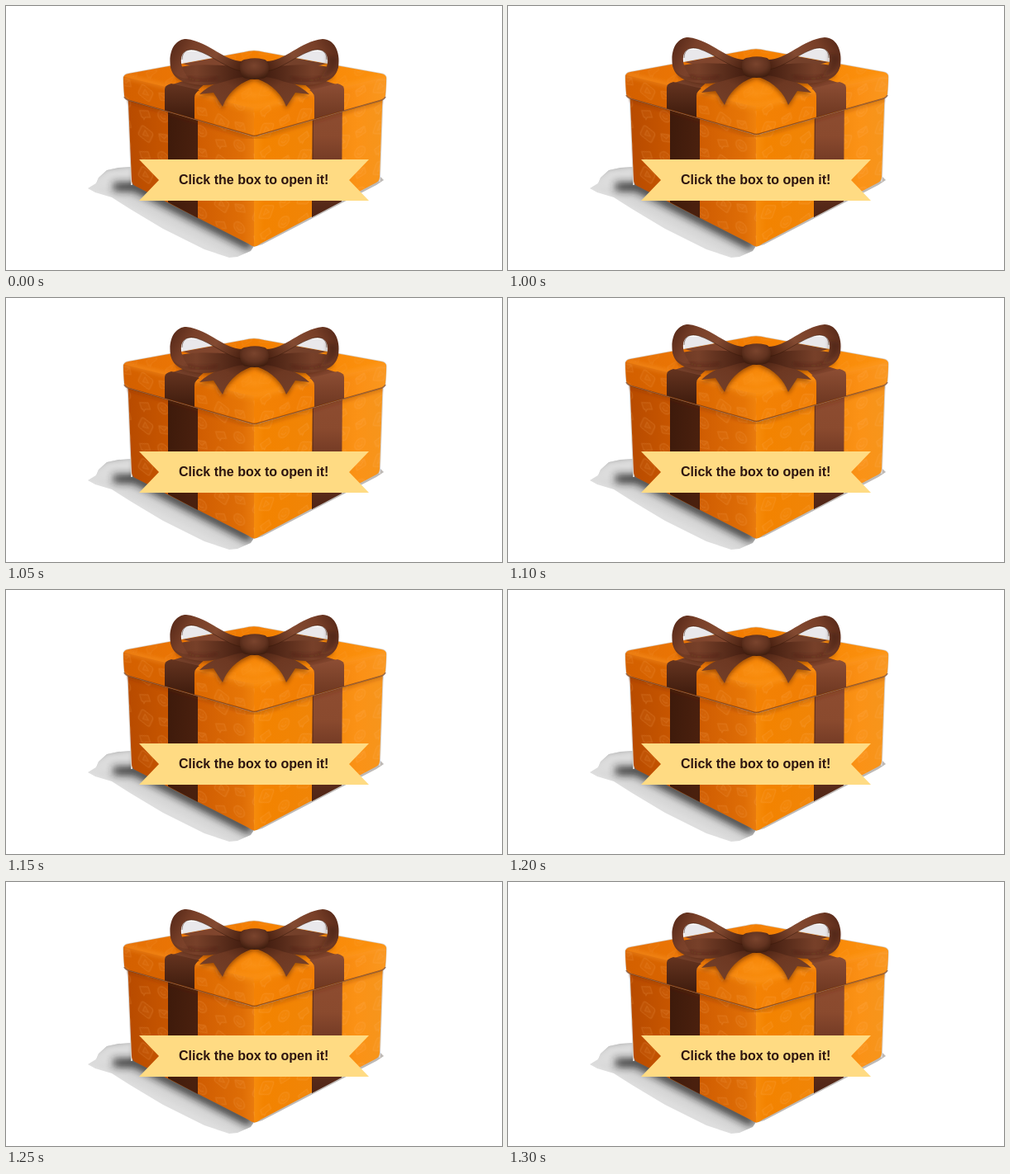
An HTML page for the animation above (1350 ms loop, 600x320 px).

```html
<!DOCTYPE html>
<html lang="en">
<head>
<meta charset="utf-8">
<title>Gift box</title>
<style>
html, body { margin: 0; width: 100%; height: 100%; overflow: hidden; background: #fff; }
svg { display: block; width: 100%; height: 100%; }
text { font: bold 16px "Liberation Sans", Arial, sans-serif; fill: #2d1510; }
</style>
</head>
<body>
<svg viewBox="0 0 600 320">
<defs>
  <linearGradient id="bodyL" gradientUnits="userSpaceOnUse" x1="148" y1="0" x2="301" y2="0">
    <stop stop-color="#b84b00"/><stop offset=".3" stop-color="#c65500"/>
    <stop offset=".56" stop-color="#d05d02"/><stop offset=".9" stop-color="#de6d06"/><stop offset="1" stop-color="#ea7c0e"/>
  </linearGradient>
  <linearGradient id="bodyR" gradientUnits="userSpaceOnUse" x1="300" y1="0" x2="456" y2="0">
    <stop stop-color="#f68c0c"/><stop offset=".08" stop-color="#f38300"/>
    <stop offset=".5" stop-color="#f08508"/><stop offset=".8" stop-color="#fb9216"/><stop offset="1" stop-color="#f6951c"/>
  </linearGradient>
  <linearGradient id="lidL" gradientUnits="userSpaceOnUse" x1="142" y1="0" x2="301" y2="0">
    <stop stop-color="#d46000"/><stop offset=".3" stop-color="#d86400"/><stop offset=".6" stop-color="#dd6a02"/>
    <stop offset=".9" stop-color="#e67506"/><stop offset="1" stop-color="#f0820c"/>
  </linearGradient>
  <linearGradient id="lidR" gradientUnits="userSpaceOnUse" x1="300" y1="0" x2="460" y2="0">
    <stop stop-color="#f48204"/><stop offset=".45" stop-color="#f07e04"/><stop offset=".8" stop-color="#fb9015"/><stop offset="1" stop-color="#f9971f"/>
  </linearGradient>
  <linearGradient id="lidTop" gradientUnits="userSpaceOnUse" x1="142" y1="0" x2="460" y2="0">
    <stop stop-color="#e57006"/><stop offset=".35" stop-color="#ee7802"/><stop offset=".6" stop-color="#f68302"/><stop offset="1" stop-color="#fc920f"/>
  </linearGradient>
  <linearGradient id="bandL" x1="0" y1="0" x2="1" y2=".3">
    <stop stop-color="#3d1a0b"/><stop offset="1" stop-color="#4a200e"/>
  </linearGradient>
  <linearGradient id="bandR" x1="0" y1="0" x2="0" y2="1">
    <stop stop-color="#8f4d31"/><stop offset=".35" stop-color="#8a4a2e"/><stop offset=".53" stop-color="#763c26"/><stop offset="1" stop-color="#4e2415"/>
  </linearGradient>
  <linearGradient id="foldL" x1="0" y1="0" x2="0" y2="1">
    <stop stop-color="#653420"/><stop offset="1" stop-color="#3c1a0c"/>
  </linearGradient>
  <linearGradient id="foldR" x1="0" y1="0" x2="0" y2="1">
    <stop stop-color="#8d4e34"/><stop offset="1" stop-color="#6c3620"/>
  </linearGradient>
  <linearGradient id="upper" x1="0" y1=".3" x2="1" y2=".6">
    <stop stop-color="#5a2b1a"/><stop offset=".25" stop-color="#783f28"/>
    <stop offset=".6" stop-color="#834a31"/><stop offset="1" stop-color="#4b2212"/>
  </linearGradient>
  <linearGradient id="lower" x1="0" y1="0" x2="1" y2="0">
    <stop stop-color="#6b3722"/><stop offset=".35" stop-color="#774029"/><stop offset="1" stop-color="#421d10"/>
  </linearGradient>
  <linearGradient id="tail" x1="1" y1="0" x2=".2" y2="1">
    <stop stop-color="#3f1b0e"/><stop offset=".45" stop-color="#6d3822"/><stop offset="1" stop-color="#74402a"/>
  </linearGradient>
  <radialGradient id="knot" cx=".5" cy=".35" r=".65">
    <stop stop-color="#7a442d"/><stop offset=".6" stop-color="#623320"/><stop offset="1" stop-color="#401e0f"/>
  </radialGradient>
  <radialGradient id="glow">
    <stop stop-color="#ff9c20" stop-opacity=".6"/><stop offset="1" stop-color="#ff9a10" stop-opacity="0"/>
  </radialGradient>
  <linearGradient id="ground" gradientUnits="userSpaceOnUse" x1="228" y1="252" x2="215" y2="278">
    <stop stop-color="#b4b4b4"/><stop offset=".6" stop-color="#d3d3d3"/><stop offset="1" stop-color="#dedede"/>
  </linearGradient>
  <filter id="soft" x="-30%" y="-30%" width="160%" height="160%"><feGaussianBlur stdDeviation="2.5"/></filter>
  <filter id="haze" x="-20%" y="-40%" width="140%" height="180%"><feGaussianBlur stdDeviation="5"/></filter>

  <g id="icons" fill="#ffb56a" fill-opacity=".25" stroke="#ffb56a" stroke-width="1.2" stroke-linejoin="round">
    <g transform="translate(13 14) rotate(22)"><rect x="-8" y="-8" width="16" height="16" rx="3"/><path d="M-2.5-4L4 0L-2.5 4Z"/></g>
    <g transform="translate(37 10) rotate(-14)"><rect x="-6" y="-4.5" width="12" height="9" rx="1"/><path d="M-6-4L0 1L6-4"/></g>
    <g transform="translate(36 36) rotate(12)"><circle r="7"/><path d="M-3.5 1Q0 6 3.5 1M-2-2.5v1M2-2.5v1"/></g>
    <g transform="translate(12 42) rotate(-20)"><path d="M-6-4h12v8h-7l-3 3v-3h-2Z"/></g>
  </g>
  <pattern id="printL" width="50" height="54" patternUnits="userSpaceOnUse" patternTransform="translate(157 88) skewY(21) scale(.92)"><use href="#icons"/></pattern>
  <pattern id="printR" width="50" height="54" patternUnits="userSpaceOnUse" patternTransform="translate(303 142) skewY(-21) scale(.92)"><use href="#icons"/></pattern>

  <path id="shade" d="M99 221L109 215L112 208L122 199L136 196L152 195L166 205L300 291L296 297L280 304L270 305L240 295L190 270L150 246L128 232L108 226Z"/>
  <clipPath id="shadeClip"><use href="#shade"/></clipPath>
  <path id="lidShape" d="M142 88Q142 83 148 82L288 56Q300 52.500 312 56L454 82Q460 83 460 88L459 107Q459 112 453 114L307 156Q300.500 159 294 156L149 114Q143 112 143 107Z"/>
  <clipPath id="lidClip"><use href="#lidShape"/></clipPath>

  <path id="tailShape" d="M283 82C268 88 247 94 234 107L251 105L262 122C267 108 278 95 298 88L298 80Z"/>
  <g id="loop">
    <path d="M199 69C201 78 213 73 224 72C243 70 262 72 287 74L288 86C272 87 260 96 239 96C214 95 198 87 199 69Z" fill="url(#lower)"/>
    <path d="M288 67C264 68 246 43 218 40C205 40 196 54 199 74C202 84 212 88 221 88C215 80 211 72 212 64C213 54 221 51 231 54C250 60 268 77 288 80Z" fill="url(#upper)"/>
    <path d="M213 65C213 54 221 51 231 54C250 60 267 76 285 79" fill="none" stroke="#351609" stroke-opacity=".5"/>
    <path d="M219 86C226 91 243 92 256 87" fill="none" stroke="#3b1a0c" stroke-opacity=".3" stroke-width="4" filter="url(#soft)"/>
  </g>
</defs>

<rect width="600" height="320" fill="#fff"/>
<use href="#shade" fill="url(#ground)"/>
<g clip-path="url(#shadeClip)">
  <path d="M99 221L112 208L122 199L152 195V214L132 222Z" fill="#dcdcdc" filter="url(#soft)"/>
  <path d="M130 219L156 219L296 291" fill="none" stroke="#222" stroke-width="10" opacity=".85" filter="url(#haze)"/>
</g>
<path d="M448 202L457 211L448 217L310 289L300 292Z" fill="#bdb9b6"/>

<g id="body">
  <path d="M147 95L152 212V217M456 95L452 208V213" fill="none" stroke="#d9d3ce" stroke-width="2"/>
  <path d="M147 95L301 130V291.500Q298 291.500 293 288L156 218Q152 216 152 211Z" fill="url(#bodyL)"/>
  <path d="M456 95L300 130V291.500Q303 291.500 308 288L448 214Q452 212 452 207Z" fill="url(#bodyR)"/>
  <path d="M147 95L301 130V290L152 215Z" fill="url(#printL)" opacity=".2"/>
  <path d="M456 95L300 130V290L452 212Z" fill="url(#printR)" opacity=".22"/>
  <path d="M196 105L232 113V257L196 238Z" fill="url(#bandL)"/>
  <path d="M371 113L407 105L406 237L370 256Z" fill="url(#bandR)"/>
  <path d="M371.500 113L370.500 256" stroke="#4a2010" stroke-width="1" opacity=".7"/>
</g>

<g id="lid">
  <path d="M213 70V55H242L256 67ZM388 70V55H359L345 67Z" fill="#e9e8eb"/>
  <path d="M143 113L294 158Q300.500 161 307 158L459 113" fill="none" stroke="#6a2900" stroke-opacity=".45" stroke-width="3" filter="url(#soft)" clip-path="inset(0 3px)"/>
  <use href="#lidShape" fill="none" stroke="#d9d3ce" stroke-width="1.500"/>
  <use href="#lidShape" fill="url(#lidTop)"/>
  <g clip-path="url(#lidClip)">
    <path d="M140 85L286 121Q295 123 301 123V162L140 116Z" fill="url(#lidL)"/>
    <path d="M462 85L315 121Q306 123 300 123V162L462 116Z" fill="url(#lidR)"/>
    <path d="M142 85L286 120Q300.500 124 315 120L460 85" fill="none" stroke="#ffa030" stroke-opacity=".4" stroke-width="5" filter="url(#soft)"/>
    <path d="M140 85L301 124V162L140 116Z" fill="url(#printL)" opacity=".18"/>
    <path d="M462 85L300 124V162L462 116Z" fill="url(#printR)" opacity=".2"/>
    <path d="M142 83L300 54L460 83L300 122Z" fill="url(#printR)" opacity=".12"/>
    <ellipse cx="300" cy="108" rx="46" ry="25" fill="url(#glow)"/>
    <path d="M300 74L350 63L388 70L340 81ZM192 98L230 86H256Q236 94 229 107Z" fill="#74402a"/>
    <path d="M301 74L251 63L213 70L261 81ZM409 98L371 86H345Q365 94 372 107Z" fill="#80452d"/>
    <path d="M192 101Q192 96 200 94L234 102Q228 105 228 111V140L192 129Z" fill="url(#foldL)"/>
    <path d="M409 101Q409 96 401 94L367 102Q373 105 373 111V140L409 129Z" fill="url(#foldR)"/>
    <g fill="#421500" opacity=".45" filter="url(#soft)" transform="translate(0 3)">
      <use href="#tailShape"/>
      <use href="#tailShape" transform="translate(601) scale(-1 1)"/>
      <path d="M204 83Q230 100 262 93L284 87H317L339 93Q371 100 397 83L390 78H211Z"/>
    </g>
  </g>
  <path d="M143 110Q144 113 149 114.500L294 156Q300.500 159 307 156L453 114.500Q458 113 459 110" fill="none" stroke="#6a2900" stroke-opacity=".6" stroke-width="1.700"/>
  <g id="bow">
    <use href="#tailShape" fill="url(#tail)"/>
    <use href="#tailShape" fill="url(#tail)" transform="translate(601) scale(-1 1)"/>
    <use href="#loop"/>
    <use href="#loop" transform="translate(601) scale(-1 1)"/>
    <path d="M400 62C402 76 395 84 381 88C388 78 391 66 387 59Z" fill="#351609" opacity=".4" filter="url(#soft)"/>
    <path d="M283 70Q284 65 291 64.500Q301 62 311 64.500Q316 65 317 70Q319 77 316 84Q314 88 309 88Q301 90 292 88Q286 88 285 83Q282 77 283 70Z" fill="url(#knot)"/>
  </g>
</g>

<path d="M161 186H439L415 211L439 236H161L185 211Z" fill="#ffdb83"/>
<text x="209" y="216">Click the box to open it!</text>
</svg>
<script>
const LOOP = 1350, REST = 1000, STEP = 50;
const LIFT = [2, 5, 8, 10, 9, 7, 3];
const lid = document.getElementById("lid");

function draw(ms) {
  const t = ms % LOOP;
  const lift = t < REST ? 0 : LIFT[Math.floor((t - REST) / STEP)];
  lid.setAttribute("transform", `translate(0 ${-lift})`);
}

const start = performance.now();
function tick() {
  draw(performance.now() - start);
  requestAnimationFrame(tick);
}
tick();
</script>
</body>
</html>
```
